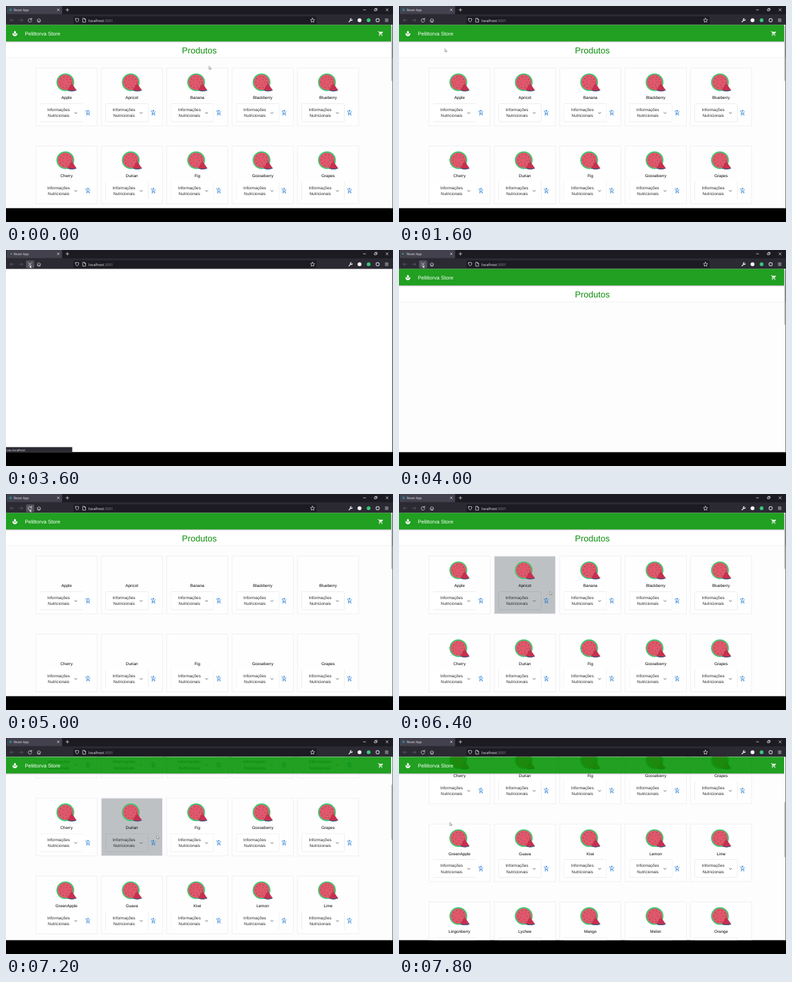
Animation, 600 px wide and 337 px high, one loop 8000 ms. Source, as an HTML page:

```html
<!DOCTYPE html>
<html lang="pt">
<head>
<meta charset="utf-8">
<title>React App</title>
<style>
html, body { margin: 0; width: 100%; height: 100%; overflow: hidden; background: #000; }
svg { display: block; width: 100%; height: 100%; font-family: "Liberation Sans", Arial, sans-serif; text-rendering: geometricPrecision; }
.mid { text-anchor: middle; }
.line { fill: none; stroke: #e6e6ea; stroke-width: .75; stroke-linecap: round; stroke-linejoin: round; }
.dim { stroke: #66656f; }
.ui { font-family: "Open Sans", "Noto Sans", sans-serif; fill: #f0f0f4; }
.label { font-size: 6.35px; }
.info { font-size: 6.4px; fill: #2b2b2b; }
.paper { filter: drop-shadow(0 .6px .5px rgba(0,0,0,.28)); }
</style>
</head>
<body>
<svg viewBox="0 0 600 337">
  <defs>
    <clipPath id="view"><rect y="29.6" width="599.2" height="285.7"/></clipPath>
    <linearGradient id="shade" x2="0" y2="1">
      <stop stop-opacity=".3"/>
      <stop offset="1" stop-opacity="0"/>
    </linearGradient>
    <g id="melon">
      <circle r="13.8" fill="#41c972"/>
      <circle r="11.9" fill="#e0586b"/>
      <g fill="none" stroke="#7a3850" stroke-linecap="round">
        <circle r="9" stroke-width="1.1" stroke-dasharray=".5 5.155"/>
        <circle r="4.8" stroke-width="1" stroke-dasharray=".4 5.63"/>
      </g>
      <path d="M9.8 1.4L2.8 12.6Q10 16 17.4 12.6Z" fill="#c6304f"/>
      <path d="M2.8 12.6Q10 16 17.4 12.6L16.9 11.8Q10 14.6 3.3 11.8Z" fill="#23628c"/>
    </g>
    <g id="cart">
      <path d="M1 3H4.5L8 12H16.2L20.2 4.6M7.6 12L6 15.4Q6.2 16.3 7 16H19" fill="none" stroke="currentColor" stroke-width="2"/>
      <circle cx="7" cy="20" r="2" fill="currentColor"/>
      <circle cx="17" cy="20" r="2" fill="currentColor"/>
    </g>
  </defs>

  <rect width="600" height="337" fill="#000"/>
  <rect width="600" height="13.5" fill="#1c1b22"/>
  <rect y="13" width="600" height="17" fill="#2b2a33"/>

  <g clip-path="url(#view)">
    <rect y="29" width="600" height="287" fill="#fff"/>
    <g id="app">
      <g id="scroller">
        <rect y="81" width="600" height="620" fill="#fdfdfe"/>
        <path d="M0 81H597" stroke="#ececef" stroke-width=".8"/>
        <text class="mid" x="299.8" y="74.3" font-size="13.5" fill="#0b8f0b">Produtos</text>
        <g id="cards"></g>
      </g>
      <rect y="55" width="600" height="2.4" fill="url(#shade)"/>
      <rect y="29" width="600" height="26.2" fill="#009200" fill-opacity=".87"/>
      <g fill="#fff">
        <path d="M13.8 38.6Q11.9 40.4 12 42.4L13.8 43.8L15.6 42.4Q15.7 40.4 13.8 38.6ZM13.8 45Q12.5 42.7 9.7 42.4Q9.9 46.2 13.8 47.3Q17.7 46.2 17.9 42.4Q15.1 42.7 13.8 45Z"/>
        <text x="29.2" y="45.6" font-size="8.05">Pelittorva Store</text>
        <use href="#cart" color="#fff" transform="translate(576.2 38.4) scale(.38)"/>
        <path d="M578.5 40.3H584.5L582.6 43H579.5Z"/>
      </g>
      <rect x="597" y="29" width="3" height="287" fill="#f7f7f9"/>
      <rect id="thumb" x="597.3" y="31" width="1.6" height="86" rx=".8" fill="#bdbdc1"/>
    </g>
    <g id="status">
      <rect y="307.5" width="102.7" height="8.5" fill="#2b2a33"/>
      <text class="ui" x="1" y="313.5" font-size="4.7">Leu localhost</text>
    </g>
  </g>

  <rect x="1" width="86" height="12.8" rx="1" fill="#42414d"/>
  <circle id="favicon" cx="7" cy="6" r="2.2" fill="#35788a"/>
  <circle id="loader" cy="6" r="1.1" fill="#3fd08a"/>
  <text class="ui" x="12" y="8" font-size="5">React App</text>
  <rect x="104.5" y="16.3" width="377" height="11.8" rx="1.5" fill="#1c1b22"/>
  <text class="ui" x="128" y="24.5" font-size="5.7">localhost<tspan fill="#8b8a96">:3001</tspan></text>
  <rect id="glow" x="31" y="16.2" width="12.8" height="12" rx="1.5" fill="#52515e"/>
  <g class="line">
    <path d="M79.6 4.6l2.8 2.8m0-2.8l-2.8 2.8M93 6h4.4M95.2 3.8v4.4"/>
    <path d="M554 6h3.6M571.5 4.8h2.7v2.7h-2.7zM572.6 4.6v-.9h2.7v2.7h-.9M589 4.2l3.6 3.6m0-3.6l-3.6 3.6"/>
    <path class="dim" d="M12 22.2H6.6m2.2-2.2l-2.2 2.2l2.2 2.2M20.6 22.2H26m-2.2-2.2l2.2 2.2l-2.2 2.2"/>
    <path id="reload" d="M39 20.3A2.8 2.8 0 1 0 39.9 23M39.8 19v2.2h-2.2"/>
    <path id="stop" d="M34.8 19.8l4.8 4.8m0-4.8l-4.8 4.8"/>
    <path d="M48.2 22.2L51 19.6L53.8 22.2M49 21.8V25H53V21.8M51 25v-1.5"/>
    <path d="M107.7 20L110.3 19.2L112.9 20Q113 23.7 110.3 25.2Q107.6 23.7 107.7 20Z"/>
    <path d="M119.3 19.2h2.4l1.7 1.7v4.3h-4.1zM121.7 19.4v1.6h1.6"/>
    <path d="M475.2 19l1 2.1l2.3.3l-1.7 1.6l.4 2.3l-2-1.1l-2 1.1l.4-2.3l-1.7-1.6l2.3-.3z"/>
    <path d="M531.8 24.7L534.8 21.7" stroke-width="1.4"/>
    <path d="M535.2 19.6a1.5 1.5 0 1 0 1.6 1.7" stroke-width="1.3"/>
    <circle cx="576.2" cy="22.2" r="2.5" stroke="#c4c4cc" stroke-width="1.2"/>
    <path d="M588 20.3h4.4m-4.4 1.9h4.4m-4.4 1.9h4.4"/>
  </g>
  <circle cx="548.1" cy="22.2" r="3" fill="#fbfbfe"/>
  <circle cx="562.2" cy="22.2" r="2.9" fill="#37c878"/>
  <path id="cursor" d="M0 0V4.9L1.2 3.9L2 5.5L2.7 5.2L2 3.6H3.6Z" fill="#fff" stroke="#555" stroke-width=".5"/>
</svg>

<script>
const LOOP = 8000, STEP = 200;
const CARD = { x: 46.4, y: 97, w: 94.8, h: 90, dx: 101.4, dy: 121.6 };
const fruits = `Apple Apricot Banana Blackberry Blueberry Cherry Durian Fig Gooseberry Grapes
  GreenApple Guava Kiwi Lemon Lime Lingonberry Lychee Mango Melon Orange`.split(/\s+/);

// [time, x, y]
const pointerKeys = [
  [0, 314.8, 93.8], [800, 314.8, 93.8], [1000, 300, 93], [1200, 205, 84], [1400, 100, 71],
  [1600, 71, 66.6], [2000, 69, 62], [2200, 58, 46], [2400, 38.5, 26], [2600, 36.7, 23.4],
  [5600, 36.7, 23.4], [5800, 43, 34], [6000, 105, 88], [6200, 205, 140], [6400, 234, 152.2],
  [7400, 234, 152.2], [7600, 135, 139], [7800, 78.8, 131.8]
];
// [time, offset]
const scrollKeys = [[0, 0], [6600, 0], [6800, 30], [7000, 86], [7200, 124.7], [7400, 170], [7600, 206]];

const el = id => document.getElementById(id);
const show = (id, on) => { el(id).style.display = on ? "" : "none"; };

function sample(keys, t) {
  const i = keys.findIndex(k => k[0] > t);
  if (i < 0) return keys[keys.length - 1].slice(1);
  const a = keys[i - 1], b = keys[i], u = (t - a[0]) / (b[0] - a[0]);
  return a.slice(1).map((v, j) => v + (b[j + 1] - v) * u);
}

const cardPosition = i => [CARD.x + i % 5 * CARD.dx, CARD.y + Math.floor(i / 5) * CARD.dy];

el("cards").innerHTML = fruits.map((name, i) => `
  <g transform="translate(${cardPosition(i)})">
    <rect class="back" width="${CARD.w}" height="${CARD.h}" stroke="#eeeef2" stroke-width=".9"/>
    <use class="melon" href="#melon" x="45.6" y="22"/>
    <text class="mid label" x="47.4" y="48.4">${name}</text>
    <rect class="paper" x="6.6" y="55.4" width="66" height="28" rx="1"/>
    <g class="mid info"><text x="35.1" y="67.2">Informações</text><text x="35.1" y="76.4">Nutricionais</text></g>
    <path d="M59.7 68.8l2.1 2.1l2.1-2.1" fill="none" stroke="#555" stroke-width=".9"/>
    <use href="#cart" color="#1976d2" transform="translate(76.3 65.6) scale(.37)"/>
    <path d="M80.7 64.9v3.2m-1.6-1.6h3.2" stroke="#1976d2" stroke-width=".75"/>
  </g>`).join("");

const cards = [...el("cards").children];
const melons = document.querySelectorAll(".melon");

function render(time) {
  const t = Math.floor(time % LOOP / STEP) * STEP;
  const [x, y] = sample(pointerKeys, t);
  const [scroll] = sample(scrollKeys, t);
  const between = (a, b) => t >= a && t < b;
  const loading = between(3400, 4200);

  show("app", !between(3400, 4000));
  show("cards", !loading);
  show("status", between(3400, 4000));
  show("stop", loading);
  show("reload", !loading);
  show("loader", loading);
  show("favicon", !loading);
  show("glow", x > 30 && x < 44 && y < 29);
  el("loader").setAttribute("cx", 7 + Math.cos((t - 3600) / 400 * Math.PI));

  const hasImages = !between(3400, 5200);
  melons.forEach(m => { m.style.display = hasImages ? "" : "none"; });

  cards.forEach((card, i) => {
    const [cx, cy] = cardPosition(i), px = x - cx, py = y + scroll - cy;
    const hover = y > 55 && px > 0 && px < CARD.w && py > 0 && py < CARD.h;
    card.querySelector(".back").setAttribute("fill", hover ? "#bdc1c4" : "#fefefe");
    card.querySelector(".paper").setAttribute("fill", hover ? "#bdc1c4" : "#fff");
  });

  el("scroller").setAttribute("transform", `translate(0 ${-scroll})`);
  el("thumb").setAttribute("y", 31 + scroll * .335);
  el("cursor").setAttribute("transform", `translate(${x} ${y})`);
}

const start = performance.now();
function tick() {
  render(performance.now() - start);
  requestAnimationFrame(tick);
}
tick();
</script>
</body>
</html>
```
